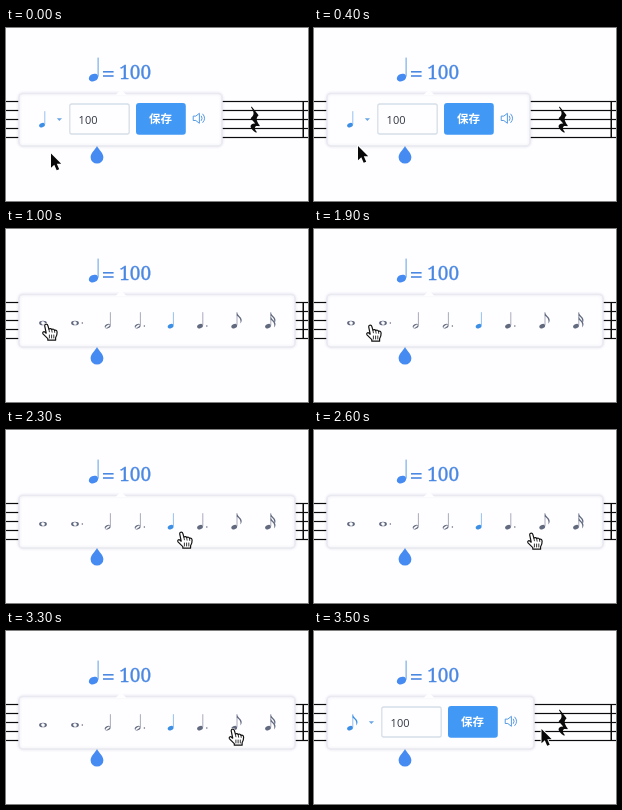
An HTML page with a canvas for the animation above (4.2 s loop, 302 by 173 pixels).

```html
<!DOCTYPE html>
<html lang="zh">
<head>
<meta charset="utf-8">
<title>Tempo editor</title>
<style>
html, body { margin: 0; width: 100%; height: 100%; overflow: hidden; background: #fefdff; }
canvas { display: block; width: 302px; height: 173px; }
</style>
</head>
<body>
<canvas id="stage" width="302" height="173"></canvas>
<script>
const ctx = document.getElementById('stage').getContext('2d');
const LOOP = 4200, STEP = 100;
const PAPER = '#fefdff', BLUE = '#468bf2', TITLE_BLUE = '#4a88e2', ICON_BLUE = '#3d8fe6', SLATE = '#626a80', INK = '#0b0b0b';

// Pointer hotspot: time, x, y
const track = [
  [0, 45, 125.5], [300, 45, 125.5], [400, 44, 118], [500, 42.5, 106], [600, 41.2, 98], [700, 41, 95],
  [1800, 41, 95], [1900, 57, 96], [2000, 85, 97], [2200, 149, 100.5], [2300, 176, 102], [2400, 195, 103.5],
  [2500, 207, 103.5], [2600, 218, 103], [2700, 226.5, 102], [2900, 226.5, 102],
  [3000, 227, 101], [3300, 227.5, 98], [LOOP, 227.5, 98]
];

function pointerAt(t) {
  const i = track.findIndex(k => k[0] > t);
  const [t0, x0, y0] = track[i - 1], [t1, x1, y1] = track[i];
  const p = (t - t0) / (t1 - t0);
  return [x0 + (x1 - x0) * p, y0 + (y1 - y0) * p];
}

function fillPath(d, color) {
  ctx.fillStyle = color;
  ctx.fill(new Path2D(d));
}

function strokePath(d, color, width) {
  ctx.strokeStyle = color;
  ctx.lineWidth = width;
  ctx.stroke(new Path2D(d));
}

function at(x, y, draw) {
  ctx.save();
  ctx.translate(x, y);
  draw();
  ctx.restore();
}

function box(x, y, w, h, r, fill, border, width) {
  ctx.beginPath();
  ctx.roundRect(x, y, w, h, r);
  ctx.fillStyle = fill;
  ctx.fill();
  if (!border) return;
  ctx.strokeStyle = border;
  ctx.lineWidth = width;
  ctx.stroke();
}

function text(str, x, y, font, color) {
  ctx.font = font;
  ctx.fillStyle = color;
  ctx.fillText(str, x, y);
}

function dot(x, y, r, color) {
  ctx.beginPath();
  ctx.arc(x, y, r, 0, Math.PI * 2);
  ctx.fillStyle = color;
  ctx.fill();
}

function noteHead(rx, ry, tilt, color, hollow) {
  ctx.beginPath();
  ctx.ellipse(0, 0, rx, ry, tilt, 0, Math.PI * 2);
  if (hollow) ctx.ellipse(0, 0, rx * hollow[0], ry * hollow[1], hollow[2], 0, Math.PI * 2);
  ctx.fillStyle = color;
  ctx.fill('evenodd');
}

function note(x, kind, color, dotted) {
  const whole = kind === 'whole';
  at(x, whole ? 94 : 97.2, () => {
    if (whole) noteHead(3.9, 2.3, 0, color, [0.48, 0.75, 0.5]);
    else {
      noteHead(3, 2.1, -0.45, color, kind === 'half' && [0.85, 0.42, -0.6]);
      strokePath('M2.8 -.8V-14', color, 0.55);
    }
    const flags = { eighth: 1, sixteenth: 2 }[kind] || 0;
    for (let i = 0; i < flags; i++) at(0, i * 4, () =>
      fillPath('M2.6 -14C3.2 -10.8 7.6 -9.5 7.5 -6Q7.4 -4.2 6.2 -2.6C7 -6.6 5 -9.2 2.6 -10.4Z', color));
    if (dotted) dot(whole ? 7.3 : 6.8, whole ? 0 : -0.2, 0.75, color);
  });
}

function staff() {
  ctx.fillStyle = INK;
  for (let i = 0; i < 5; i++) ctx.fillRect(0, 72.9 + i * 9, 302, 1.2);
  ctx.fillRect(296.5, 73, 1.5, 37);
  fillPath('M245.6 78.5L252.6 87.2C250 89.8 249.7 92 253.8 97.6L253.2 98.3C249 96.8 247.3 99.6 250.8 104L250.2 104.8' +
    'C243.2 100.8 242.6 95.4 249.2 95.6L244.6 90.2C248.4 87 248.6 84.4 245 79.2Z', INK);
}

function tempoMark() {
  at(87.5, 49.6, () => {
    noteHead(4.9, 3.6, -0.45, BLUE);
    strokePath('M4.6 -1V-20', '#5f9fe4', 1);
  });
  ctx.fillStyle = TITLE_BLUE;
  for (const y of [43, 47.2]) ctx.fillRect(97, y, 10.6, 1.6);
  text('100', 113.2, 51, '19px "Noto Serif", serif', TITLE_BLUE);
  ctx.strokeStyle = TITLE_BLUE;
  ctx.lineWidth = 0.3;
  ctx.strokeText('100', 113.2, 51);
}

function panel(width) {
  ctx.save();
  ctx.shadowColor = 'rgba(70,80,130,.12)';
  ctx.shadowBlur = 3;
  box(13, 65.5, width, 52.5, 4, PAPER, '#e9eaf1', 1.5);
  ctx.restore();
  fillPath('M109.5 67L115 61.5L120.5 67Z', PAPER);
}

function speaker(x) {
  at(x, 90.3, () => {
    ctx.lineJoin = ctx.lineCap = 'round';
    strokePath('M0 -2.2H2.2L5.8 -5V5L2.2 2.2H0ZM7.8 -2.2Q9.4 0 7.8 2.2M9.2 -4.2Q13 0 9.2 4.2', '#559be4', 1);
  });
}

function editor(kind) {
  const shift = kind === 'eighth' ? 4 : 0;
  panel(203 + shift);
  note(36, kind, ICON_BLUE);
  at(shift, 0, () => {
    fillPath('M50.8 90.2H56L53.4 93Z', '#69a5e4');
    box(63.8, 76, 59.4, 30, 2, PAPER, '#d6dfe8', 1.3);
    text('100', 72.6, 96, '11px "Open Sans", "Noto Sans", sans-serif', '#2f3542');
    box(130, 75, 49.8, 31.8, 3, '#4299f5');
    text('保存', 143, 95.2, '900 11.5px "Noto Sans CJK SC", "Noto Sans CJK", sans-serif', '#fff');
    speaker(187.6);
  });
}

function picker() {
  panel(276);
  note(37, 'whole', SLATE);
  note(69, 'whole', SLATE, true);
  note(101.6, 'half', SLATE);
  note(131.6, 'half', SLATE, true);
  note(164.6, 'quarter', ICON_BLUE);
  note(194, 'quarter', SLATE, true);
  note(228.2, 'eighth', SLATE);
  note(262, 'sixteenth', SLATE);
}

function arrow() {
  const d = 'M0 0V14.2L3.3 11.2L5.7 16.8L8.2 15.7L5.8 10.2H10.2Z';
  ctx.lineJoin = 'round';
  strokePath(d, '#fff', 1.8);
  fillPath(d, '#080808');
}

function hand() {
  const d = 'M-2.3 1.8C-2.4 -.2 .4 -.4 .9 1.6L1.9 5.2C2.8 4.2 4.4 4.5 4.7 5.6C5.8 4.8 7.2 5.3 7.5 6.4' +
    'C9.1 5.7 10.1 6.7 10.1 8.2C10.2 10.8 9.8 11.8 8.6 13.7V16.2H.8V14.6L-4 9.8C-5 8.3 -3.2 7 -2 8.2L-.8 9.2Z';
  ctx.lineJoin = ctx.lineCap = 'round';
  strokePath(d, '#fff', 2.2);
  fillPath(d, '#fff');
  strokePath(d, '#111', 1.2);
  strokePath('M1.9 5.2L2.4 7.8M4.7 5.6L5.1 8.2M7.5 6.4L7.7 8.4M2.4 11V14M4.6 11V14M6.8 11V14', '#111', 0.85);
}

function render(now) {
  const t = Math.floor(now % LOOP / STEP) * STEP;
  ctx.fillStyle = PAPER;
  ctx.fillRect(0, 0, 302, 173);
  staff();
  tempoMark();
  if (t < 1000) editor('quarter');
  else if (t < 3500) picker();
  else editor('eighth');
  fillPath('M91 118C93 122 97.4 125 97.4 129.2A6.4 6.3 0 0 1 84.6 129.2C84.6 125 89 122 91 118Z', BLUE);
  const [x, y] = pointerAt(t);
  at(x, y, t >= 600 && t < 3500 ? hand : arrow);
}

const start = performance.now();
function tick() {
  render(performance.now() - start);
  requestAnimationFrame(tick);
}
tick();
</script>
</body>
</html>
```
